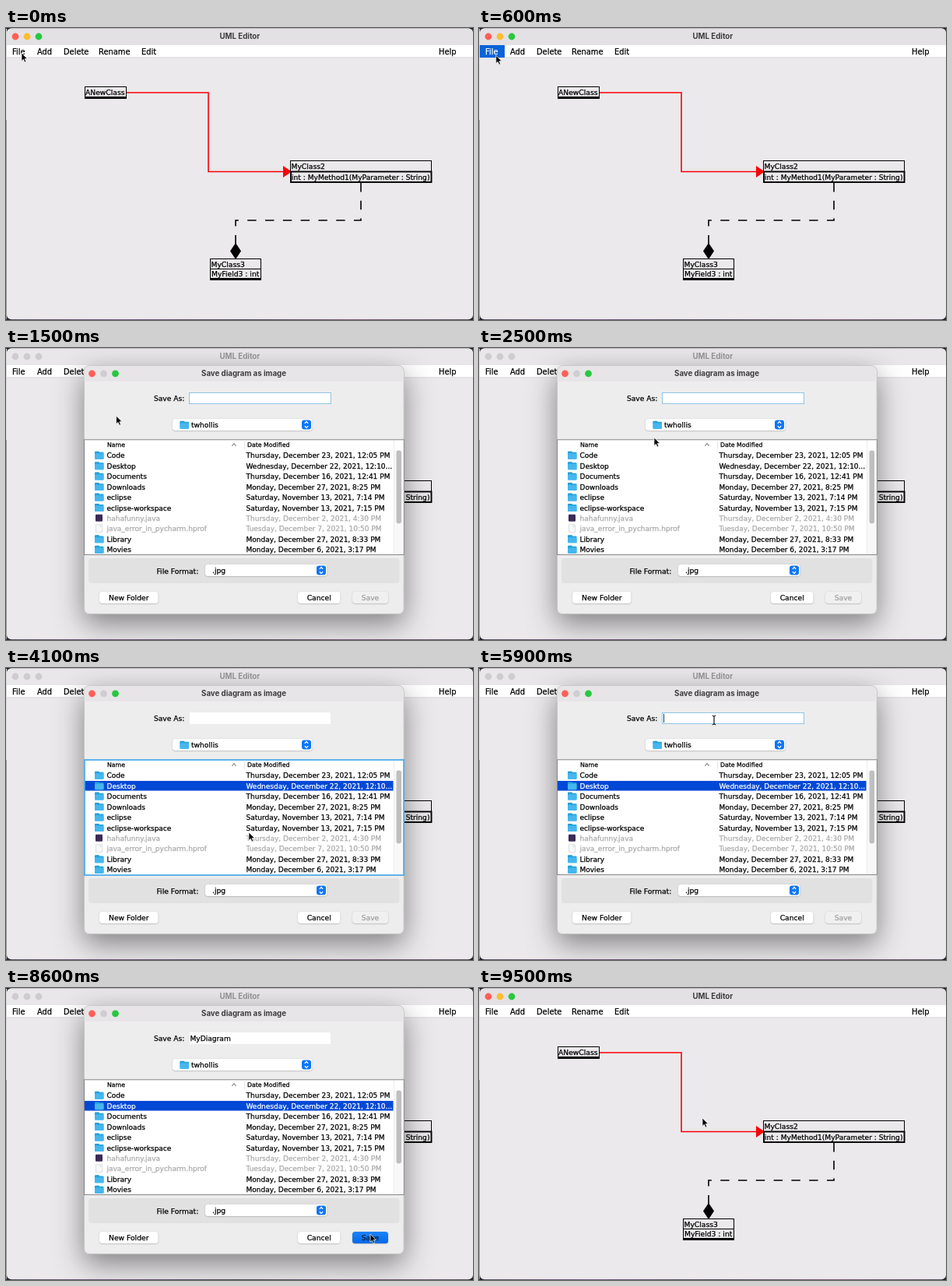
Write an HTML page with a canvas that moves like this. It is 600 by 375 pixels and loops after 9600 ms.

```html
<!DOCTYPE html>
<html lang="en">
<head>
<meta charset="utf-8">
<title>UML Editor</title>
<style>
html, body { margin: 0; width: 100%; height: 100%; overflow: hidden; background: #2a2a30; }
canvas { display: block; width: 600px; height: 375px; }
</style>
</head>
<body>
<canvas id="stage"></canvas>
<script>
const canvas = document.getElementById('stage');
const ctx = canvas.getContext('2d');
const ratio = window.devicePixelRatio || 1;
canvas.width = 600 * ratio;
canvas.height = 375 * ratio;

const LOOP = 9600, STEP = 100;
const UI = '"DejaVu Sans", sans-serif';
const TITLE = 'Inter, sans-serif';
const LIGHTS = ['#ff5f57', '#febc2e', '#28c840'];

// Times of the interface events, in ms
const MENU_ON = 200, DIALOG_ON = 1500, PICK = 3400, FOCUS = 5500;
const TYPE_ON = 6200, TYPE_STEP = 160, MOVE_ON = 7700, PRESS = 8500, DIALOG_OFF = 8700;
const FILE_NAME = 'MyDiagram';

const FILES = [
  ['Code', 'Thursday, December 23, 2021, 12:05 PM'],
  ['Desktop', 'Wednesday, December 22, 2021, 12:10...'],
  ['Documents', 'Thursday, December 16, 2021, 12:41 PM'],
  ['Downloads', 'Monday, December 27, 2021, 8:25 PM'],
  ['eclipse', 'Saturday, November 13, 2021, 7:14 PM'],
  ['eclipse-workspace', 'Saturday, November 13, 2021, 7:15 PM'],
  ['hahafunny.java', 'Thursday, December 2, 2021, 4:30 PM', 'code'],
  ['java_error_in_pycharm.hprof', 'Tuesday, December 7, 2021, 10:50 PM', 'page'],
  ['Library', 'Monday, December 27, 2021, 8:33 PM'],
  ['Movies', 'Monday, December 6, 2021, 3:17 PM']
];

// Pointer path: time, x, y of the tip
const PATH = [
  [0, 20, 32], [500, 21, 33], [1100, 32, 62], [1300, 32, 62], [1600, 180, 96],
  [1900, 180, 96], [2500, 225, 115], [2800, 190, 135], [3200, 165, 150], [3500, 165, 150],
  [4100, 312, 211], [4600, 314, 212], [5300, 302, 67], [7700, 302, 67],
  [8300, 468, 316], [9000, 468, 316], [9500, 287, 167]
];

function pointerAt(t) {
  for (let i = 1; i < PATH.length; i++) {
    const [t0, x0, y0] = PATH[i - 1], [t1, x1, y1] = PATH[i];
    if (t <= t1) {
      const u = (t - t0) / (t1 - t0), e = u * u * (3 - 2 * u);
      return [x0 + (x1 - x0) * e, y0 + (y1 - y0) * e];
    }
  }
  return PATH[PATH.length - 1].slice(1);
}

function box(x, y, w, h, fill) {
  ctx.fillStyle = fill;
  ctx.fillRect(x, y, w, h);
}

function frame(x, y, w, h, color, width = 1) {
  ctx.strokeStyle = color;
  ctx.lineWidth = width;
  ctx.strokeRect(x, y, w, h);
}

function round(x, y, w, h, r, fill, stroke) {
  ctx.beginPath();
  ctx.roundRect(x, y, w, h, r);
  if (fill) { ctx.fillStyle = fill; ctx.fill(); }
  if (stroke) { ctx.strokeStyle = stroke; ctx.lineWidth = 1; ctx.stroke(); }
}

// A hairline outline gives the slightly heavy strokes of the interface font
function text(s, x, y, size = 9.1, color = '#000', align = 'left') {
  ctx.font = `400 ${size}px ${UI}`;
  ctx.textAlign = align;
  ctx.fillStyle = ctx.strokeStyle = color;
  ctx.lineWidth = 0.25;
  ctx.fillText(s, x, y);
  ctx.strokeText(s, x, y);
}

function heading(s, x, y, color) {
  ctx.font = `700 9.7px ${TITLE}`;
  ctx.textAlign = 'center';
  ctx.fillStyle = color;
  ctx.fillText(s, x, y);
}

function poly(points, fill) {
  ctx.beginPath();
  points.forEach(([x, y]) => ctx.lineTo(x, y));
  ctx.closePath();
  ctx.fillStyle = fill;
  ctx.fill();
}

function line(points, color, width, dash = []) {
  ctx.beginPath();
  points.forEach(([x, y]) => ctx.lineTo(x, y));
  ctx.strokeStyle = color;
  ctx.lineWidth = width;
  ctx.setLineDash(dash);
  ctx.stroke();
  ctx.setLineDash([]);
}

function lights(x, y, gap, colors) {
  colors.forEach((c, i) => {
    ctx.beginPath();
    ctx.arc(x + i * gap, y, 4.4, 0, 7);
    ctx.fillStyle = c;
    ctx.fill();
  });
}

function backdrop() {
  box(0, 0, 600, 375, '#29272e');
  box(0, 1, 1, 117, '#d9d9dc');
  box(0, 118, 1, 256, '#97969a');
  const glow = ctx.createLinearGradient(0, 0, 600, 0);
  ['#2c2436', '#4b2a5c', '#221d2c', '#5a3158', '#2a2230'].forEach((c, i) => glow.addColorStop(i / 4, c));
  box(0, 374, 600, 1, glow);
}

function menuBar(fileOpen) {
  box(1, 22, 599, 16, '#fff');
  box(1, 37.5, 599, 0.8, '#cfcdcf');
  if (fileOpen) box(1, 22, 32, 16, '#0a63d9');
  text('File', 8, 33.5, 9.9, fileOpen ? '#fff' : '#000');
  [['Add', 40], ['Delete', 74], ['Rename', 119], ['Edit', 174], ['Help', 556]]
    .forEach(([s, x]) => text(s, x, 33.5, 9.9));
}

function diagram() {
  const red = '#fb0007';
  line([[155, 83], [260, 83], [260, 184.5], [357, 184.5]], red, 1.6);
  poly([[356, 177], [367, 184.5], [356, 192]], red);
  line([[456, 199], [456, 247], [295, 247], [295, 277]], '#000', 1.6, [11.4, 11.4]);
  poly([[295, 276], [302, 286.5], [295, 297], [288, 286.5]], '#000');

  frame(101.5, 75.5, 53, 15, '#000');
  box(101, 88, 54, 3, '#000');
  text('ANewClass', 102, 85.5, 9.2);

  frame(365.5, 170.5, 181, 14, '#000');
  frame(366, 184.5, 180.5, 13.5, '#000', 1.9);
  text('MyClass2', 366.5, 181.3, 9.2);
  text('int : MyMethod1(MyParameter : String)', 367, 194.7, 9.1);

  frame(262.5, 296.5, 65, 27, '#000');
  box(262, 309, 66, 1, '#000');
  box(262, 321, 66, 3, '#000');
  text('MyClass3', 263.5, 306.5, 9.2);
  text('MyField3 : int', 264, 319, 9.2);
}

function mainWindow(active, fileOpen) {
  round(1, 0.6, 599, 373.6, 6, '#ebe9eb');
  round(1, 0.6, 599, 21.4, [6, 6, 0, 0], active ? '#e3e1e3' : '#e9e7e9');
  lights(12, 11, 15, active ? LIGHTS : Array(3).fill('#cecccf'));
  heading('UML Editor', 300.3, 14.2, active ? '#3e3c3e' : '#989698');
  menuBar(fileOpen);
  diagram();
}

function folder(x, y) {
  round(x, y - 0.3, 6, 4, 1, '#1d93cf');
  round(x, y + 0.8, 11.5, 8.9, 1, '#2ba6e0');
  round(x, y + 2.6, 11.5, 7.1, 1, '#45b7ee');
}

function icon(kind, x, y) {
  if (kind === 'code') round(x + 1, y, 9, 9, 1, '#3a2a55');
  else if (kind === 'page') {
    round(x + 1.5, y - 0.5, 8, 10, 0.5, '#fafafa', '#dedede');
    poly([[x + 6.5, y - 0.5], [x + 9.5, y + 2.5], [x + 6.5, y + 2.5]], '#dedede');
  } else folder(x, y);
}

function shadowed(draw, blur, drop, alpha) {
  ctx.save();
  ctx.shadowColor = `rgba(0,0,0,${alpha})`;
  ctx.shadowBlur = blur * ratio;
  ctx.shadowOffsetY = drop * ratio;
  draw();
  ctx.restore();
}

function button(label, x, w, fill, color) {
  shadowed(() => round(x, 313, w, 15, 3.5, fill), 1.5, 0.5, 0.3);
  text(label, x + w / 2, 324, 9.2, color, 'center');
}

function combo(x, y, w) {
  shadowed(() => round(x, y, w, 15, 3.5, '#fff'), 1.5, 0.5, 0.3);
  const k = x + w - 13.5;
  round(k, y + 1.5, 12, 12, 3, '#0f76f5');
  [-1, 1].forEach(s => line([[k + 3.8, y + 7.5 + s * 1.6], [k + 6, y + 7.5 + s * 4], [k + 8.2, y + 7.5 + s * 1.6]], '#fff', 1.2));
}

function table(picked, focused) {
  box(100.5, 118, 411, 148, '#fff');
  text('Name', 130, 127, 7.8);
  text('Date Modified', 310, 127, 7.8);
  line([[290.5, 126], [293, 122.5], [295.5, 126]], '#555', 0.9);
  box(306, 120, 1, 10, '#e2e2e2');
  box(498.5, 131, 12, 134, '#f8f8f8');
  box(498, 118, 0.7, 147, '#e4e4e4');
  round(501.5, 131.5, 6.5, 94, 3.2, '#c0bfc0');

  ctx.save();
  ctx.beginPath();
  ctx.rect(100, 118, 411, 147);
  ctx.clip();
  FILES.forEach(([name, date, kind], i) => {
    const y = 138 + i * 13.45, on = picked && i === 1;
    if (on) box(101, y - 6.5, 396.5, 12.6, '#0048d6');
    icon(kind, 114, y - 5);
    const color = on ? '#fff' : kind ? '#a9a9a9' : '#000';
    text(name, 129.5, y + 3.3, 9, color);
    text(date, 308.5, y + 3.3, 9, color);
  });
  ctx.restore();

  if (focused) frame(100.9, 118, 410.2, 148, '#50ade8', 1.8);
  else frame(100.5, 117.8, 410.8, 147.7, '#7c7a7c', 0.9);
}

function nameField(typed, focused, caret) {
  box(236, 57, 181, 15, '#fff');
  if (focused) frame(235.5, 57.5, 182, 14, '#8fc4e2');
  text(typed, 236.5, 68, 9.1);
  if (caret) box(237 + ctx.measureText(typed).width, 59, 0.9, 11, '#222');
}

function dialog(t) {
  const picked = t >= PICK, tableFocus = picked && t < FOCUS;
  const fieldFocus = !tableFocus && t < PRESS;
  const count = Math.max(0, Math.min(FILE_NAME.length, Math.floor((t - TYPE_ON) / TYPE_STEP) + 1));
  shadowed(() => round(100, 22.5, 411.5, 319.5, 7, '#ececec'), 36, 12, 0.46);
  round(100.3, 22.8, 410.9, 318.9, 7, '#eeedee', '#bcbabc');
  round(100.5, 23, 410.5, 20, [7, 7, 0, 0], '#e7e5e7');
  lights(110.5, 32.8, 15, [LIGHTS[0], '#cfcdcf', LIGHTS[2]]);
  heading('Save diagram as image', 305.5, 36.3, '#3e3c3e');

  text('Save As:', 190, 68, 9.1);
  nameField(FILE_NAME.slice(0, count), fieldFocus, fieldFocus && t >= FOCUS);
  combo(214, 91, 179.5);
  folder(223.5, 94);
  text('twhollis', 238, 102, 9.1);
  table(picked, tableFocus);

  round(106, 270, 399.5, 32, 4, '#e2e1e2');
  text('File Format:', 193.5, 289.7, 9.2);
  combo(256, 278, 156.5);
  text('.jpg', 265, 289.3, 9.2);

  button('New Folder', 120, 75.5, '#fff', '#000');
  button('Cancel', 375, 54.5, '#fff', '#000');
  if (count) {
    const blue = ctx.createLinearGradient(0, 313, 0, 328);
    blue.addColorStop(0, '#1c83f8');
    blue.addColorStop(1, '#0569e8');
    button('Save', 445, 46, blue, '#0a1c38');
  } else button('Save', 445, 46, '#f1f0f1', '#a09ea0');
}

function arrow(x, y) {
  const shape = [[0, 0], [0, 10.4], [2.4, 8.2], [4, 12], [5.8, 11.2], [4.2, 7.5], [7.3, 7.4]]
    .map(([a, b]) => [x + a, y + b]);
  poly(shape, '#000');
  line([...shape, shape[0]], '#fff', 0.7);
}

function beam(x, y) {
  line([[x, y - 5], [x, y + 5]], '#000', 1.1);
  [-1, 1].forEach(s => line([[x - 2.3, y + s * 6], [x, y + s * 5], [x + 2.3, y + s * 6]], '#000', 1));
}

function pointer(t, open) {
  const [x, y] = pointerAt(t);
  const overField = open && x > 236 && x < 417 && y > 57 && y < 72;
  if (!overField) arrow(x, y);
  else if (t < TYPE_ON || t >= MOVE_ON) beam(x, y);
}

function draw(t) {
  const open = t >= DIALOG_ON && t < DIALOG_OFF;
  ctx.setTransform(ratio, 0, 0, ratio, 0, 0);
  backdrop();
  mainWindow(!open, t >= MENU_ON && t < DIALOG_ON);
  if (open) dialog(t);
  pointer(t, open);
}

const start = performance.now();
function tick() {
  const t = (performance.now() - start) % LOOP;
  draw(Math.floor(t / STEP) * STEP);
  requestAnimationFrame(tick);
}
tick();
</script>
</body>
</html>
```
